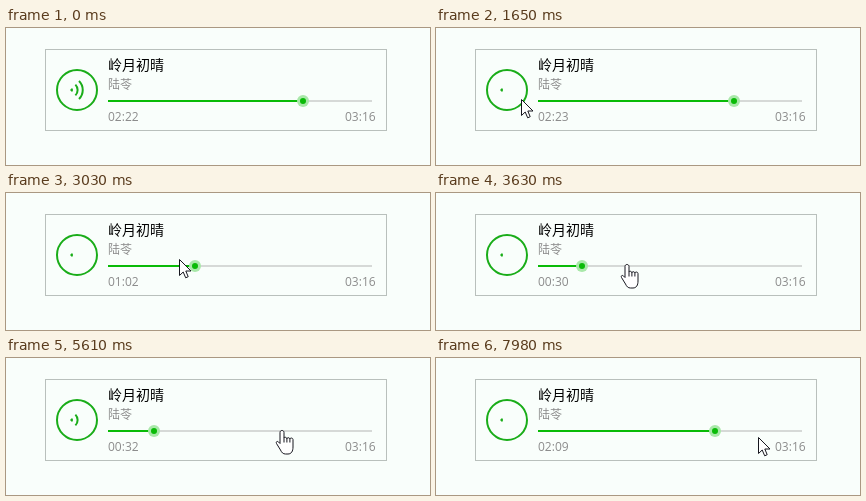
These frames come from a looping animation (424x137 px, 8 s). An HTML page:

```html
<!DOCTYPE html>
<html lang="zh">
<head>
<meta charset="utf-8">
<style>
  html, body { margin: 0; width: 100%; height: 100%; overflow: hidden; background: #f9fefb; }
  svg { display: block; width: 424px; height: 137px; }
  text { font: 12px "Open Sans", "Noto Sans CJK SC", "Noto Sans CJK", sans-serif; fill: #8c8c8c; }
  .title { font-size: 14px; fill: #000; }
  .cursor { fill: #fff; stroke: #16161e; stroke-linejoin: round; }
</style>
</head>
<body>
<svg viewBox="0 0 424 137">
  <rect x="39.5" y="21.5" width="341" height="81" fill="none" stroke="#b9c0bc"/>
  <g fill="none" stroke="#1aad19" stroke-width="2">
    <circle cx="71" cy="62" r="20"/>
    <path d="M64 62l2-2a2.8 2.8 0 0 1 0 4z" fill="#1aad19" stroke="none"/>
    <path class="wave" d="M69.4 56.6a7.7 7.7 0 0 1 0 10.8"/>
    <path class="wave" d="M73 53a12.7 12.7 0 0 1 0 18"/>
  </g>
  <text class="title" x="102" y="42">岭月初晴</text>
  <text x="102" y="61">陆苓</text>
  <rect x="102" y="72" width="264" height="2" fill="#d6d9d7"/>
  <rect id="fill" x="102" y="72" height="2" fill="#09bb07"/>
  <g id="knob">
    <circle r="6" fill="#a9e8a9"/>
    <circle r="3" fill="#09bb07"/>
  </g>
  <text id="clock" x="102" y="93"></text>
  <text x="339" y="93">03:16</text>
  <path id="arrow" class="cursor" d="M.5 .5V16.5L4.2 13L6.7 18.8L9.2 17.7L6.8 12H12Z"/>
  <path id="hand" class="cursor" d="M0 .5C-1.2 .5-2 1.3-2 2.5V13.5L-3.7 11.8C-4.9 10.8-6.3 12-5.5 13.5L-1.5 20C-.3 22.5 1 24 3.5 24H6C9.5 24 11 21 11 17V9.6C11 7.6 8 7.6 7.9 9.2C7.8 7.4 5 7.2 4.9 8.8C4.8 7 2 6.8 2 8V2.5C2 1.3 1.2 .5 0 .5ZM2 8V12.5M4.9 8.8V12.5M7.9 9.2V12.5"/>
</svg>
<script>
const $ = id => document.getElementById(id);
const waveArcs = document.querySelectorAll('.wave');
const DURATION = 196, TRACK = 264, ORIGIN = 105.3;
const DRAG_START = 2670, DRAG_END = 3180, CLICK = 5640, SEEKED = 6150;

// Stretches of playback: clock reading at its zero time, and when the icon restarts
const plays = [
  { since: 0, zero: 640, sec: 142, wave: 1230 },
  { since: DRAG_END, zero: 3280, sec: 30, wave: 3420 },
  { since: SEEKED, zero: 5870, sec: 127, wave: SEEKED },
];

// Pointer moves: start, end, destination
const moves = [
  [90, 660, 60, 75], [660, 870, 72, 70], [1620, 2380, 296, 76],
  [DRAG_START, 3200, 146, 66], [3330, 4140, 236, 72], [4140, 4590, 276, 72],
  [7080, 7440, 318, 84], [7800, 7980, 322, 79],
];

const easeOut = (p, power) => 1 - (1 - p) ** power;

function pointer(t) {
  let x = 424, y = 46;
  for (const [from, to, toX, toY] of moves) {
    const p = Math.min(1, Math.max(0, (t - from) / (to - from)));
    x += (toX - x) * easeOut(p, 1.5);
    y += (toY - y) * easeOut(p, 4);
  }
  return [Math.round(x), Math.round(y)];
}

function waveCount(t, play) {
  if (t >= DRAG_START && t < 3420) return 0;
  if (t < play.wave) return 2;
  return Math.floor((t - play.wave) / 510) % 3;
}

function seconds(t, play) {
  if (t >= DRAG_START && t < DRAG_END) {
    // The knob trails the pointer slightly
    return Math.floor((pointer(t - 60)[0] - ORIGIN) * DURATION / TRACK);
  }
  return play.sec + Math.max(0, Math.floor((t - play.zero) / 1000));
}

const show = (el, on) => el.style.display = on ? '' : 'none';
const place = (el, x, y) => el.setAttribute('transform', `translate(${x} ${y})`);
const pad = n => String(n).padStart(2, '0');

function draw(t) {
  const play = plays.findLast(p => p.since <= t);
  const count = waveCount(t, play);
  waveArcs.forEach((arc, i) => show(arc, i < count));

  const sec = seconds(t, play);
  $('clock').textContent = pad(Math.floor(sec / 60)) + ':' + pad(sec % 60);

  // A click moves the knob before the clock catches up
  const knobSec = t >= CLICK && t < SEEKED ? plays[2].sec : sec;
  const knobX = Math.round(ORIGIN + knobSec * TRACK / DURATION);
  place($('knob'), knobX, 73);
  $('fill').setAttribute('width', knobX - 102);

  const [x, y] = pointer(t);
  const onButton = Math.hypot(x - 71, y - 62) < 16;
  const onTrack = x > 102 && x < 366 && Math.abs(y - 72) <= 1;
  const hover = onButton || onTrack;
  show($('hand'), hover);
  show($('arrow'), !hover && t >= 90);
  place($('hand'), x, y);
  place($('arrow'), x, y);
}

const start = performance.now();
function tick() {
  const t = (performance.now() - start) % 8000;
  draw(Math.floor(t / 30) * 30);
  requestAnimationFrame(tick);
}
tick();
</script>
</body>
</html>
```
